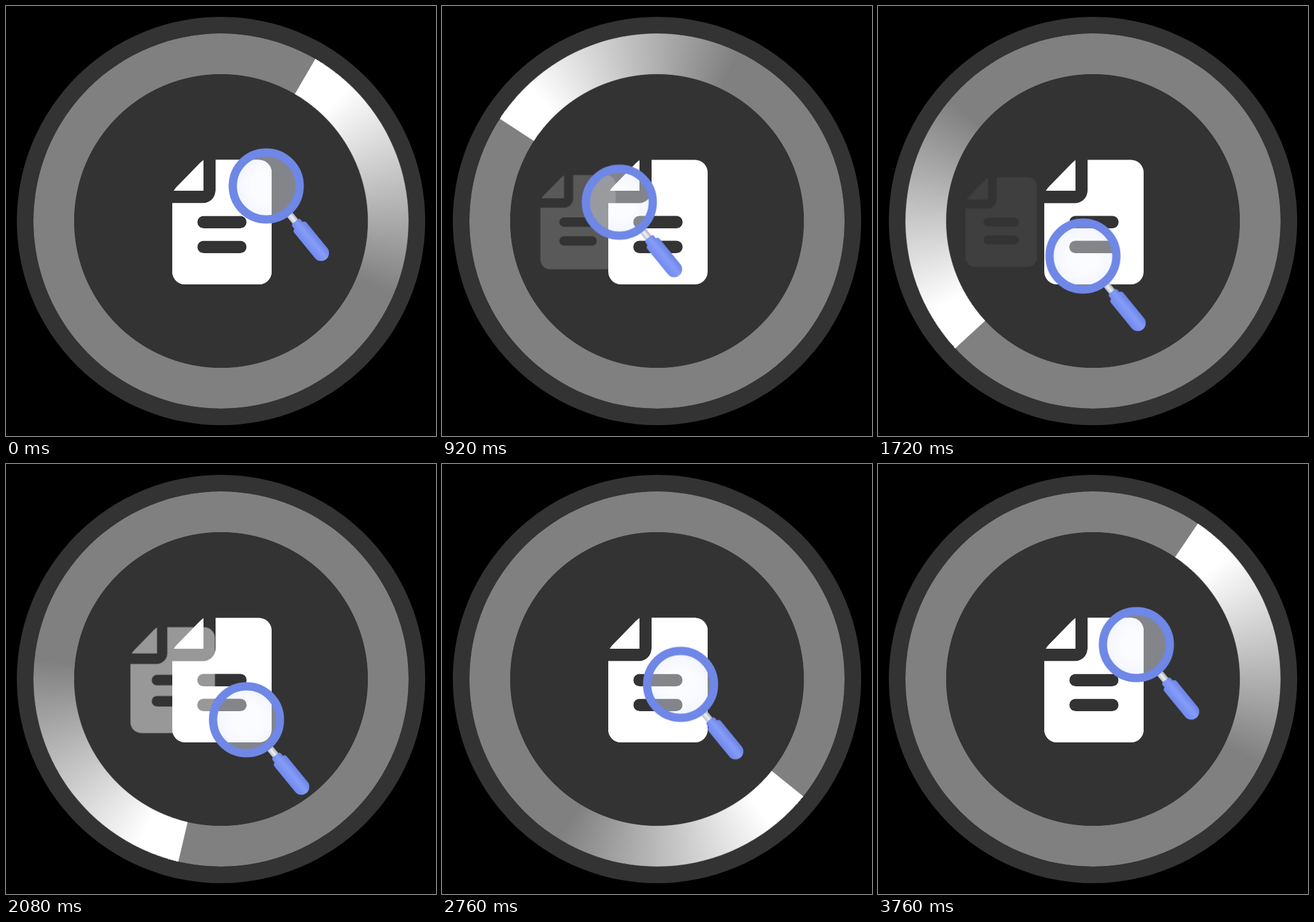
Write an HTML page without scripts that moves like this. It is 675 px wide and 675 px high and loops after 3.8 s.

```html
<!DOCTYPE html>
<html lang="en">
<head>
<meta charset="utf-8">
<title>Document search</title>
<style>
  html, body { margin: 0; width: 100%; height: 100%; overflow: hidden; background: #000; }
  .stage { position: relative; width: 675px; height: 675px; overflow: hidden; }
  .stage > * { position: absolute; }
  .disc { inset: 16.5px 17px 17.5px; border-radius: 50%; background: #333; }
  .ring {
    inset: 43px;
    border-radius: 50%;
    -webkit-mask: radial-gradient(circle, transparent 230.2px, #000 231px);
    mask: radial-gradient(circle, transparent 230.2px, #000 231px);
  }
  .track { background: rgb(255 255 255 / .38); }
  .sweep {
    background: conic-gradient(#fff 13deg, rgb(255 255 255 / 0) 83deg);
    animation: spin 3.8s linear infinite;
  }
  .art { inset: 0; }
  .back { transform-origin: 339px 339px; animation: slide 3.8s infinite; }
  .lens { animation: search 3.8s linear infinite; }

  @keyframes spin {
    from { transform: rotate(30.4deg); }
    to { transform: rotate(-329.6deg); }
  }
  @keyframes slide {
    0%, 4%, 72.6%, 100% {
      transform: none; opacity: 1;
      animation-timing-function: cubic-bezier(.65, 0, .35, 1);
    }
    35.8%, 36.9% {
      transform: translateX(-155px) scale(.7); opacity: 0;
      animation-timing-function: cubic-bezier(.65, 0, .35, 1);
    }
  }
  @keyframes search {
    0%, 100% { transform: translate(408px, 282px); }
    3.42% { transform: translate(400px, 277px); }
    6.84% { transform: translate(375px, 270.5px); }
    10.26% { transform: translate(345px, 266px); }
    13.68% { transform: translate(321px, 266.5px); }
    19.21% { transform: translate(296px, 282px); }
    24.74% { transform: translate(276px, 310px); }
    30.26% { transform: translate(265.5px, 341px); }
    35.79% { transform: translate(268px, 365.5px); }
    40.53% { transform: translate(288px, 379.5px); }
    45.26% { transform: translate(321px, 392px); }
    50% { transform: translate(355px, 400px); }
    54.74% { transform: translate(377px, 401px); }
    59.21% { transform: translate(384px, 393px); }
    63.68% { transform: translate(383px, 379.5px); }
    68.16% { transform: translate(379px, 362.5px); }
    72.63% { transform: translate(374px, 345.5px); }
    78.42% { transform: translate(364.5px, 324px); }
    84.21% { transform: translate(359px, 304.5px); }
    87.89% { transform: translate(365.5px, 296.5px); }
    91.58% { transform: translate(378px, 291px); }
    95.26% { transform: translate(392px, 287px); }
    98.95% { transform: translate(405px, 283px); }
  }
</style>
</head>
<body>
<div class="stage">
  <div class="disc"></div>
  <div class="ring track"></div>
  <div class="ring sweep"></div>
  <svg class="art" width="675" height="675" viewBox="0 0 675 675">
    <defs>
      <path id="page" fill="#fff" fill-rule="evenodd" d="
        M310 242V290H263.5Q265 287 268 284L304 247Q307 244 310 242Z
        M329 241.500H397a20 20 0 0 1 20 20V417a20 20 0 0 1-20 20H281a20 20 0 0 1-20-20V309.500H309a20 20 0 0 0 20-20Z
        M310 329.500a9.750 9.750 0 0 0 0 19.500h58a9.750 9.750 0 0 0 0-19.500Z
        M310 368.500a9.750 9.750 0 0 0 0 19.500h58a9.750 9.750 0 0 0 0-19.500Z"/>
      <radialGradient id="glass">
        <stop offset=".5" stop-color="#f6f8ff" stop-opacity=".42"/>
        <stop offset="1" stop-color="#e4eaff" stop-opacity=".45"/>
      </radialGradient>
      <radialGradient id="rim" gradientUnits="userSpaceOnUse" r="59">
        <stop offset=".77" stop-color="#6a80dc"/>
        <stop offset=".84" stop-color="#7b92f0"/>
        <stop offset=".92" stop-color="#8aa1fa"/>
        <stop offset="1" stop-color="#6f87e6"/>
      </radialGradient>
      <linearGradient id="grip" x1="0" y1="0" x2="0" y2="1">
        <stop stop-color="#6b83e6"/>
        <stop offset=".45" stop-color="#869df8"/>
        <stop offset="1" stop-color="#7089ee"/>
      </linearGradient>
      <linearGradient id="steel" x1="0" y1="0" x2="0" y2="1">
        <stop stop-color="#a9adba"/>
        <stop offset=".5" stop-color="#f0f1f5"/>
        <stop offset="1" stop-color="#b9bdca"/>
      </linearGradient>
    </defs>
    <use class="back" href="#page"/>
    <use href="#page"/>
    <g class="lens">
      <g transform="translate(.5 .5)">
        <g transform="rotate(50.7)">
          <rect x="56" y="-5.500" width="20" height="11" fill="url(#steel)"/>
          <rect x="72" y="-8.500" width="20" height="17" rx="4" fill="url(#grip)"/>
          <path fill="url(#grip)" d="M85-12.500H136a12.500 12.500 0 0 1 0 25H85q-5 0-5-5v-15q0-5 5-5Z"/>
        </g>
        <circle r="47" fill="url(#glass)"/>
        <circle r="52.500" fill="none" stroke="url(#rim)" stroke-width="13"/>
      </g>
    </g>
  </svg>
</div>
</body>
</html>
```
